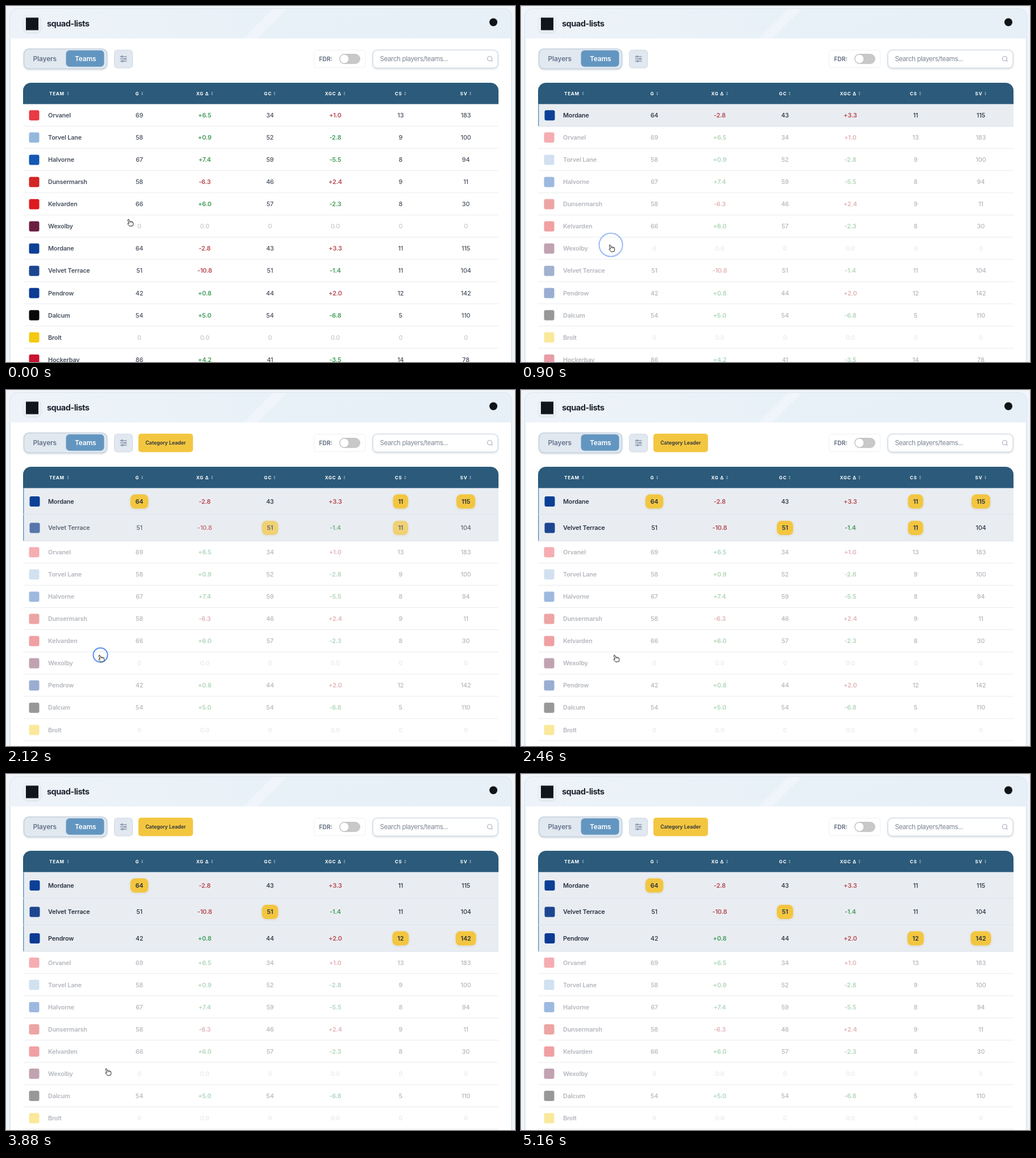
An HTML page that plays this animation: 895 by 626 pixels, repeating every 5200 ms.

```html
<!DOCTYPE html>
<html lang="en">
<head>
<meta charset="utf-8">
<title>Squad table</title>
<style>
  html, body { margin: 0; width: 100%; height: 100%; overflow: hidden; background: #f0f4f8; }
  svg { display: block; width: 895px; height: 626px; font-family: Inter, "Open Sans", sans-serif; }
  .head text { font-size: 8px; font-weight: 700; letter-spacing: .8px; fill: #fff; }
  .row text { font-size: 10.8px; font-weight: 600; letter-spacing: -.15px; fill: #48515f; }
  .row .num { text-anchor: middle; font-weight: 500; }
  .row .up { fill: #3f9b57; font-weight: 600; }
  .row .down { fill: #b8474f; font-weight: 600; }
  .row .none { fill: #c3c7cd; }
  .row.on .name, .row.on .num:not(.up):not(.down) { fill: #2a3341; }
  .row .num.lead { font-weight: 600; }
</style>
</head>
<body>
<svg id="stage" viewBox="0 0 895 626" xmlns="http://www.w3.org/2000/svg">
  <defs>
    <linearGradient id="bar" x1="0" y1="0" x2="1" y2="0">
      <stop offset="0" stop-color="#edf3f9"/><stop offset=".5" stop-color="#e9f1f8"/><stop offset="1" stop-color="#e8f0f7"/>
    </linearGradient>
    <filter id="soft" x="-30%" y="-30%" width="160%" height="170%">
      <feDropShadow dx="0" dy="1.2" stdDeviation="1.6" flood-color="#64748b" flood-opacity=".28"/>
    </filter>
    <filter id="glow" x="-40%" y="-40%" width="180%" height="190%">
      <feDropShadow dx="0" dy="1" stdDeviation="2" flood-color="#8a7a40" flood-opacity=".2"/>
    </filter>
    <clipPath id="top"><path d="M7 57V19a14 14 0 0 1 14-14H875a14 14 0 0 1 14 14V57z"/></clipPath>
  </defs>

  <rect width="895" height="626" fill="#f0f4f8"/>
  <rect x="7" y="5" width="882" height="650" rx="14" fill="#fff" stroke="#d3e1ee" stroke-width="1.5"/>
  <g clip-path="url(#top)">
    <rect x="7" y="5" width="882" height="52" fill="url(#bar)"/>
    <path d="M418 57 470 5h24L442 57z" fill="#fff" opacity=".25"/>
  </g>

  <rect x="31" y="17" width="30" height="29" rx="7" fill="#e6eef6" filter="url(#soft)" opacity=".6"/>
  <rect x="35" y="20.5" width="22" height="22" fill="#10151c"/>
  <text x="72" y="36.3" font-size="14.5" font-weight="700" letter-spacing="-.5" fill="#1c2430">squad-lists</text>
  <circle cx="857" cy="28.5" r="7" fill="#0f1419"/>

  <rect x="31.5" y="75.5" width="146" height="35" rx="9" fill="#e1e8f0" stroke="#c3d1de" stroke-width="1.5" filter="url(#soft)"/>
  <rect x="105.5" y="78" width="67" height="28.8" rx="6" fill="#6296c0"/>
  <g font-size="11.9" font-weight="600" letter-spacing="-.15" text-anchor="middle">
    <text x="68.3" y="97.3" fill="#64748b">Players</text>
    <text x="139.8" y="97.3" fill="#fff">Teams</text>
  </g>

  <rect x="190.5" y="77.5" width="32" height="31.5" rx="5" fill="#e1e8f0" stroke="#cfdae4"/>
  <g fill="#e1e8f0" stroke="#64748b" stroke-width="1">
    <path d="M200.5 89H212.5M200.5 93H212.5M200.5 97H212.5"/>
    <circle cx="204" cy="89" r="1.4"/><circle cx="209.5" cy="93" r="1.4"/><circle cx="205" cy="97" r="1.4"/>
  </g>

  <g id="leader">
    <rect x="232.8" y="76.8" width="96" height="32.4" rx="5" fill="#f3c640"/>
    <text x="280.7" y="96.2" font-size="8.8" font-weight="600" text-anchor="middle" fill="#26303d">Category Leader</text>
  </g>

  <rect x="541.5" y="77.5" width="90.5" height="31" rx="5" fill="#fff" stroke="#edf0f3"/>
  <text x="550.5" y="97" font-size="10.3" font-weight="600" fill="#5a6778">FDR:</text>
  <rect x="586" y="84" width="37" height="18" rx="9" fill="#c8c8c8"/>
  <circle cx="595" cy="93" r="7.3" fill="#fff"/>

  <rect x="645" y="77.5" width="220" height="31.5" rx="8" fill="#fff" stroke="#d6dee6" stroke-width="1.5" filter="url(#soft)"/>
  <text x="657.5" y="97.3" font-size="11.6" letter-spacing="-.4" fill="#7d8794">Search players/teams...</text>
  <g fill="none" stroke="#a3abb5" stroke-width="1.1"><circle cx="850.5" cy="92.5" r="4"/><path d="M853.5 95.5 855.5 97.5"/></g>

  <g id="rows"></g>

  <g class="head" id="head">
    <path d="M30 172.6V149a14 14 0 0 1 14-14H852a14 14 0 0 1 14 14V172.6z" fill="#2b5a7a"/>
  </g>

  <circle id="ring" fill="none" stroke="#4a84f0" stroke-width="2"/>
  <g id="hand" stroke="#222" stroke-linejoin="round" stroke-linecap="round">
    <path fill="#fff" d="M-3.2 -5.6c.8-.4 1.5 0 1.8.8l1.1 2.9c.4-.6 1.5-.7 1.9.1c.5-.6 1.5-.5 1.9.2c.6-.4 1.5 0 1.7.8l.5 2c.3 1.4-.1 2.2-.4 3.2l-.1 1-5.5.9-.5-.9c-1-.7-2-1.7-3-2.7c-.9-.9-.2-1.9.9-1.6l1.2.5-1.9-5.6c-.2-.7 0-1.3.6-1.6z"/>
    <path fill="none" stroke-width=".7" d="M-.3-1.9l.6 1.8M1.6-1.8l.5 1.7M3.5-1.6l.4 1.6"/>
  </g>
</svg>

<script>
const LOOP = 5200, TOP = 172.8, ROW = 39.05, TALL = 46.5, DIM = .41;
const COLS = [234.5, 349.4, 464.2, 579, 693.8, 808.6];
const LEAD_COLS = [0, 2, 4, 5];
const HEADS = ['G', 'XG Δ', 'GC', 'XGC Δ', 'CS', 'SV'];

const TEAMS = `Orvanel|#e93a45|69 +6.5 34 +1.0 13 183
Torvel Lane|#94b8dc|58 +0.9 52 -2.8 9 100
Halvorne|#1557b3|67 +7.4 59 -5.5 8 94
Dunsermarsh|#d22624|58 -6.3 46 +2.4 9 11
Kelvarden|#dc1a20|66 +6.0 57 -2.3 8 30
Wexolby|#6a1f42|0 0.0 0 0.0 0 0
Mordane|#0c4096|64 -2.8 43 +3.3 11 115
Velvet Terrace|#1c468f|51 -10.8 51 -1.4 11 104
Pendrow|#0d3a94|42 +0.8 44 +2.0 12 142
Dalcum|#080808|54 +5.0 54 -6.8 5 110
Brolt|#f4c90f|0 0.0 0 0.0 0 0
Hockerbay|#c8142f|86 +4.2 41 -3.5 14 78`.split('\n').map(line => {
  const [name, color, cells] = line.split('|');
  return { name, color, cells: cells.split(' ') };
});

// Each click selects one more team.
const CLICKS = [
  { at: 610, team: 6, x: 158, y: 420 },
  { at: 2015, team: 7, x: 166, y: 466 },
  { at: 3390, team: 8, x: 178, y: 518 }
];
const SWAP_DELAY = 15, FADE = 180, RING = 440;

// start, end, x, y
const START = [218, 381];
const MOVES = [
  [0, 560, 159, 426],
  [1240, 1740, 167, 472],
  [2740, 3240, 179, 524],
  [4640, 5160, 190, 642]
];

const $ = id => document.getElementById(id);
const clamp = v => Math.min(1, Math.max(0, v));
const ease = p => 1 - (1 - p) ** 4 * (1 + 4 * p);

function add(parent, tag, attrs, text) {
  const el = document.createElementNS('http://www.w3.org/2000/svg', tag);
  for (const k in attrs) el.setAttribute(k, attrs[k]);
  if (text) el.textContent = text;
  parent.append(el);
  return el;
}

function addHead(label, x, anchor, arrowX) {
  add($('head'), 'text', { x, y: 157, 'text-anchor': anchor }, label);
  add($('head'), 'path', {
    d: `M${arrowX} 151.3v5M${arrowX - 1.2} 152.5l1.2-1.2 1.2 1.2M${arrowX - 1.2} 155.2l1.2 1.2 1.2-1.2`,
    fill: 'none', stroke: '#b9cbd8', 'stroke-width': .7
  });
}

addHead('TEAM', 76, 'start', 109);
HEADS.forEach((label, i) => {
  const half = [5, 13, 8, 16, 8, 8][i];
  addHead(label, COLS[i] - 3.6, 'middle', COLS[i] + half);
});

function tone(value, col) {
  if (col !== 1 && col !== 3) return '';
  const good = col === 1 ? '+' : '-';
  return value[0] === good ? 'up' : 'down';
}

for (const team of TEAMS) {
  const empty = team.cells.every(v => +v === 0);
  team.row = add($('rows'), 'g', { class: 'row' });
  team.back = add(team.row, 'rect', { x: 30, width: 836, fill: '#e9edf2' });
  team.edge = add(team.row, 'rect', { x: 30, width: 1.5, fill: '#6598c2' });
  team.line = add(team.row, 'rect', { x: 30, width: 836, height: 1 });
  team.body = add(team.row, 'g', {});
  team.crest = add(team.body, 'rect', { y: -9, width: 18, height: 18, rx: 3, fill: team.color });
  add(team.body, 'text', { class: 'name', x: 74, y: 3.8 }, team.name);
  team.badges = team.cells.map((value, col) => {
    const badge = LEAD_COLS.includes(col) && add(team.body, 'rect', {
      y: -12.5, height: 25, rx: 8, fill: '#f3c640', filter: 'url(#glow)'
    });
    const kind = empty ? 'none' : tone(value, col);
    const text = add(team.body, 'text', { class: 'num ' + kind, x: COLS[col], y: 3.8 }, value);
    if (badge) {
      const w = text.getComputedTextLength() + 18;
      badge.setAttribute('x', COLS[col] - w / 2);
      badge.setAttribute('width', w);
    }
    return { badge, text };
  });
}

function layout(count) {
  const chosen = CLICKS.slice(0, count).map(c => TEAMS[c.team]);
  const compare = count > 1;
  const best = COLS.map((_, col) => Math.max(...chosen.map(team => +team.cells[col])));
  let y = TOP;
  for (const team of [...chosen, ...TEAMS.filter(t => !chosen.includes(t))]) {
    const on = chosen.includes(team), h = on && compare ? TALL : ROW;
    team.on = on;
    team.row.classList.toggle('on', on);
    team.row.setAttribute('transform', `translate(0 ${y.toFixed(2)})`);
    team.body.setAttribute('transform', `translate(0 ${(h / 2).toFixed(2)})`);
    team.crest.setAttribute('x', on ? 41.5 : 40.5);
    for (const el of [team.back, team.edge]) {
      el.setAttribute('height', h);
      el.setAttribute('visibility', on ? 'visible' : 'hidden');
    }
    team.line.setAttribute('y', h - 1);
    team.line.setAttribute('fill', on ? '#d9e0e8' : '#e8ebef');
    team.badges.forEach(({ badge, text }, col) => {
      if (!badge) return;
      const lead = on && compare && +team.cells[col] === best[col];
      badge.setAttribute('visibility', lead ? 'visible' : 'hidden');
      text.classList.toggle('lead', lead);
    });
    y += h;
  }
  $('leader').setAttribute('visibility', compare ? 'visible' : 'hidden');
}

function cursorAt(t) {
  let [x, y] = START;
  for (const [from, to, tx, ty] of MOVES) {
    const p = ease(clamp((t - from) / (to - from)));
    x += (tx - x) * p;
    y += (ty - y) * p;
  }
  return [x, y];
}

let shown = -1;

function draw(t) {
  const count = CLICKS.filter(c => t >= c.at + SWAP_DELAY).length;
  if (count !== shown) layout(shown = count);

  const swapAt = i => CLICKS[i].at + SWAP_DELAY;
  const dim = 1 - (1 - DIM) * clamp((t - swapAt(0)) / FADE);
  for (const team of TEAMS) {
    const i = CLICKS.findIndex(c => TEAMS[c.team] === team);
    const before = i > 0 ? DIM : 1;
    const opacity = team.on ? before + (1 - before) * clamp((t - swapAt(i)) / FADE) : dim;
    team.body.setAttribute('opacity', opacity);
  }

  const [x, y] = cursorAt(t);
  $('hand').setAttribute('transform', `translate(${x.toFixed(2)} ${y.toFixed(2)})`);

  const click = CLICKS.find(c => t >= c.at && t < c.at + RING);
  const ring = $('ring');
  ring.setAttribute('visibility', click ? 'visible' : 'hidden');
  if (click) {
    const p = (t - click.at) / RING;
    ring.setAttribute('cx', click.x);
    ring.setAttribute('cy', click.y);
    ring.setAttribute('r', 8 + 19 * p);
    ring.setAttribute('opacity', 1 - p * p);
  }
}

const begin = performance.now();
function tick() {
  draw((performance.now() - begin) % LOOP);
  requestAnimationFrame(tick);
}
tick();
</script>
</body>
</html>
```
